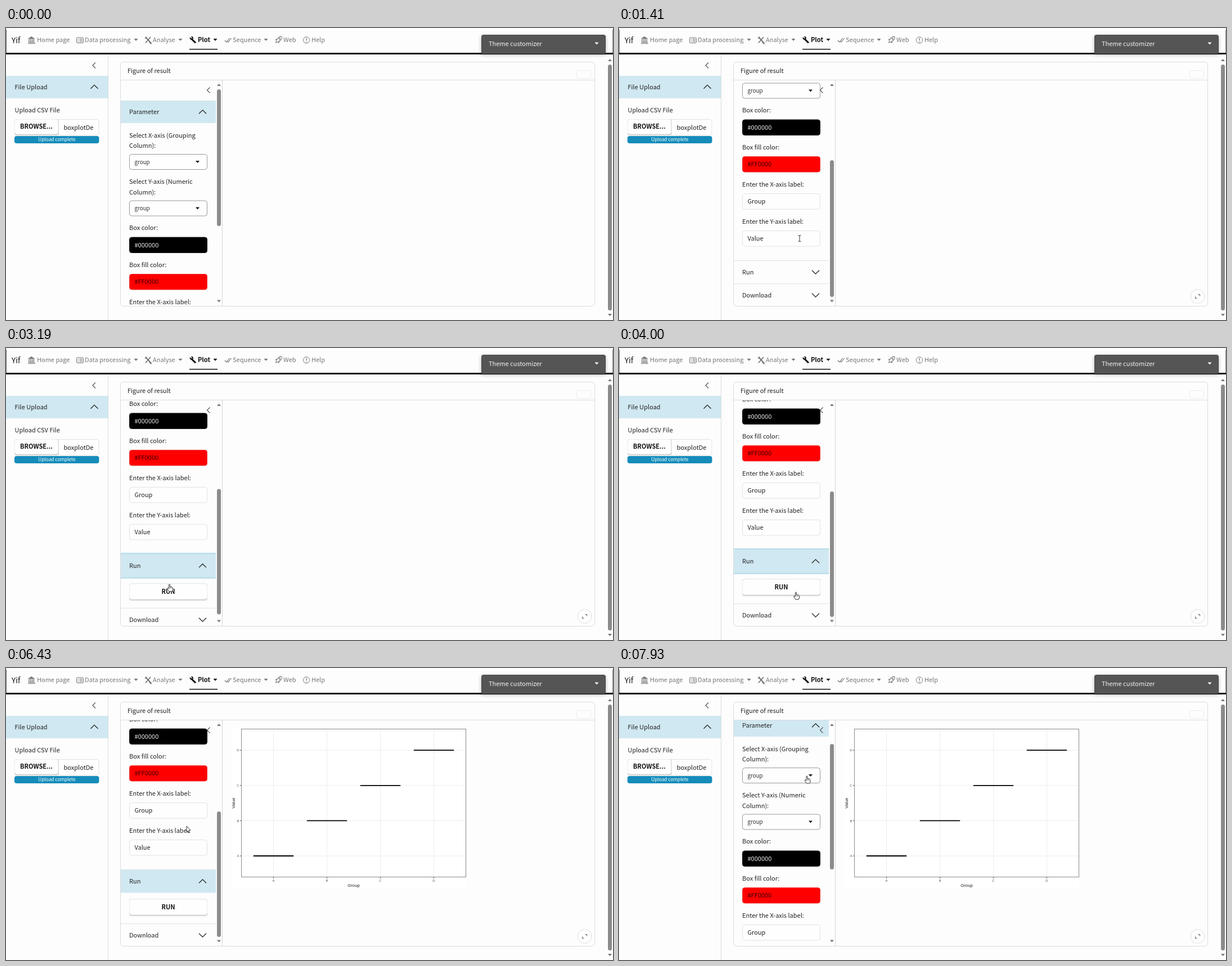
These frames come from a looping animation (1079x519 px, 8 s). An HTML page with a canvas:

```html
<!DOCTYPE html>
<html lang="en">
<head>
<meta charset="utf-8">
<title>Box plot panel</title>
<style>
  html, body { margin: 0; width: 100%; height: 100%; overflow: hidden; background: #fdfdfd; }
  canvas { display: block; }
</style>
</head>
<body>
<canvas id="stage" width="1079" height="519"></canvas>
<script>
const c = document.getElementById('stage').getContext('2d');
const LOOP = 8000, INK = '#222', GREY = '#777', BLUE = [208, 232, 241];
const SANS = '"Noto Sans CJK SC", "Noto Sans CJK JP", "Noto Sans CJK", "Open Sans", sans-serif';
const PLOT_SANS = '"Liberation Sans", sans-serif';

// Each key is [time, ...values]
const SCROLL = [[980, 0], [1180, 130], [1300, 190], [1390, 209], [3060, 209], [3190, 256],
  [3300, 264], [6950, 264], [7320, 182], [7930, 47]];
const POINTER = [[100, 345, -16], [940, 321, 374], [1430, 321, 374], [2050, 287, 432], [2680, 285, 432],
  [2960, 285, 417], [3100, 285, 417], [3490, 325, 437], [3680, 325, 437], [4380, 301, 430],
  [5600, 301, 430], [6380, 321, 281], [6500, 321, 281], [7320, 326, 237], [7930, 334, 192]];

const smooth = p => p * p * (3 - 2 * p);
const ramp = (t, from, to) => Math.min(1, Math.max(0, (t - from) / (to - from)));

function track(keys, t, ease = p => p) {
  let i = 0;
  while (i < keys.length - 2 && t > keys[i + 1][0]) i++;
  const [a, b] = [keys[i], keys[i + 1]], p = ease(ramp(t, a[0], b[0]));
  return a.slice(1).map((v, k) => v + (b[k + 1] - v) * p);
}

function text(str, x, mid, { size = 11, color = INK, bold = false, align = 'left', font = SANS } = {}) {
  c.font = `${bold ? 'bold ' : ''}${size}px ${font}`;
  c.fillStyle = color;
  c.textAlign = align;
  c.fillText(str, x, mid + size * 0.36);
}

function rect(x, y, w, h, color) {
  c.fillStyle = color;
  c.fillRect(x, y, w, h);
}

function box(x, y, w, h, r, fill, stroke) {
  c.beginPath();
  c.roundRect(x, y, w, h, r);
  if (fill) { c.fillStyle = fill; c.fill(); }
  if (stroke) { c.strokeStyle = stroke; c.lineWidth = 1; c.stroke(); }
}

function line(points, color = INK, width = 1) {
  c.beginPath();
  for (let i = 0; i < points.length; i += 2) c.lineTo(points[i], points[i + 1]);
  c.strokeStyle = color;
  c.lineWidth = width;
  c.stroke();
}

function polygon(points, fill, stroke) {
  c.beginPath();
  for (let i = 0; i < points.length; i += 2) c.lineTo(points[i], points[i + 1]);
  c.closePath();
  c.fillStyle = fill;
  c.fill();
  if (stroke) { c.strokeStyle = stroke; c.lineWidth = 1; c.stroke(); }
}

function ring(x, y, r, color, fill) {
  c.beginPath();
  c.arc(x, y, r, 0, 7);
  if (fill) { c.fillStyle = fill; c.fill(); }
  c.strokeStyle = color;
  c.lineWidth = 1;
  c.stroke();
}

// dir 1 points down, -1 points up
const triangle = (x, y, color, dir = 1, w = 3.5) =>
  polygon([x - w, y - 2 * dir, x + w, y - 2 * dir, x, y + 2 * dir], color);
const chevron = (x, y, dir) => line([x - 6.5, y - 3.2 * dir, x, y + 3.2 * dir, x + 6.5, y - 3.2 * dir], INK, 1.3);
const backArrow = (x, y) => line([x + 2.5, y - 5, x - 2.5, y, x + 2.5, y + 5], '#555', 1.2);
const blueMix = k => `rgb(${BLUE.map(v => 253 + (v - 253) * k)})`;

function scrollbar(x, top, bottom, thumbTop, thumbHeight) {
  triangle(x, top, '#777', -1);
  triangle(x, bottom, '#777');
  box(x - 3.5, thumbTop, 7, thumbHeight, 3.5, '#8b8b8b');
}

function button(x, y, w, h, label) {
  box(x, y, w, h, 4, '#d6d6d6');
  box(x + .5, y + .5, w - 1, h - 3, 4, '#fefefe', '#ececec');
  if (label) text(label, x + w / 2, y + h / 2 - 1, { bold: true, align: 'center', color: '#111' });
}

function icons() {
  polygon([39, 19, 45, 15, 51.5, 19], GREY);
  for (let x = 41; x < 51; x += 2.8) line([x, 19, x, 25], GREY, 1.4);
  line([40, 25.5, 51, 25.5], GREY);
  line([39, 27.5, 52, 27.5], GREY, 1.2);

  box(125.5, 17, 12, 9.5, 1.5, null, GREY);
  for (const y of [19.5, 21.8, 24]) {
    line([127.5, y, 129, y], GREY);
    line([130.5, y, 136, y], GREY);
  }

  line([248, 16, 257.5, 26.5], GREY, 2);
  line([257, 16, 248, 26.5], GREY, 1.8);
  line([247, 18, 249, 18, 250, 15.5], GREY, 1.3);
  line([255, 25, 258.5, 28], GREY, 2.4);

  line([330, 19.5, 337, 26.5], '#111', 3);
  line([327, 17, 329, 20, 332, 18, 330, 15], '#111', 2);

  line([389, 22, 392, 25, 397.5, 18], GREY, 1.2);
  line([394, 24, 395, 25, 400.5, 18], GREY, 1.2);

  c.save();
  c.translate(484.5, 21);
  c.rotate(Math.PI / 4);
  c.beginPath();
  c.ellipse(0, -1, 2.8, 6.5, 0, 0, 7);
  c.strokeStyle = GREY;
  c.stroke();
  ring(0, -2.5, 1, GREY);
  polygon([-2.5, 0, -5, 4, -2, 3.5], GREY);
  polygon([2.5, 0, 5, 4, 2, 3.5], GREY);
  line([0, 5, 0, 8], GREY);
  c.restore();

  ring(534, 21.5, 5.6, GREY);
  line([534, 18, 534, 22.5], GREY, 1.3);
  line([534, 24, 534, 25.2], GREY, 1.3);
}

function navbar() {
  rect(0, 44, 1079, 3, '#151519');
  rect(0, 3, 1, 41, '#666');
  rect(1078, 3, 1, 41, '#888');
  text('Yif', 10, 22, { size: 13.5, color: '#111' });
  icons();
  [['Home page', 55], ['Data processing', 140, 231], ['Analyse', 261, 310], ['Plot', 341, 372],
    ['Sequence', 403, 462], ['Web', 493], ['Help', 543]].forEach(([label, x, caret]) => {
    const bold = label === 'Plot', color = bold ? '#111' : GREY;
    text(label, x, 21.5, { color, bold });
    if (caret) triangle(caret, 21, color);
  });
  rect(326, 37, 50, 1.5, '#111');

  c.save();
  c.shadowColor = 'rgba(0,0,0,.3)';
  c.shadowBlur = 6;
  c.shadowOffsetY = 2;
  box(845, 12, 221, 33.5, [4, 4, 1, 1], '#555');
  c.restore();
  box(845.5, 12.5, 220, 33, [4, 4, 1, 1], null, '#484848');
  text('Theme customizer', 858, 28.5, { color: '#f2f2f2' });
  triangle(1050, 27.5, '#fff');
}

function sidebar() {
  rect(181, 47, 1, 472, '#dcdcdc');
  backArrow(156.5, 66.5);
  rect(0, 85, 181, 40, blueMix(1));
  text('File Upload', 15.5, 105);
  chevron(157, 104.5, -1);
  text('Upload CSV File', 15.5, 146);
  box(15.5, 162.5, 149.5, 28, 4, '#fefefe', '#e2e2e2');
  button(15, 162, 78, 29);
  rect(93, 163, 1, 27, '#ddd');
  text('BROWSE...', 25, 175.5, { bold: true, color: '#111' });
  text('boxplotDe', 102.5, 177);
  box(15, 192, 150.5, 13, 4, '#158cba');
  text('Upload complete', 90.5, 198.5, { size: 8.3, color: '#fff', align: 'center' });
}

function select(y) {
  box(219.5, y + .5, 138, 27, 4, '#fefefe', '#9a9a9a');
  text('group', 228.5, y + 14, { size: 9.8, color: '#333' });
  triangle(340.5, y + 14, '#111');
}

function field(y, value, fill = '#fefefe', color = INK, border = '#e2e2e2') {
  box(219.5, y + .5, 138, 27.5, 4, fill, border);
  text(value, 228.5, y + 14.3, { color });
}

function parameters(t, scroll, open) {
  c.save();
  c.beginPath();
  c.rect(204, 93, 170, 401);
  c.clip();
  c.translate(0, -scroll);

  rect(204, 129, 169, 40, blueMix(1));
  text('Parameter', 219, 149);
  chevron(349.5, 149, -1);
  [['Select X-axis (Grouping', 191], ['Column):', 209.5], ['Select Y-axis (Numeric', 273], ['Column):', 291.8],
    ['Box color:', 355.5], ['Box fill color:', 421.5], ['Enter the X-axis label:', 487.3],
    ['Enter the Y-axis label:', 553.3]].forEach(([label, y]) => text(label, 219, y));
  select(224);
  select(306.5);
  field(371.5, '#000000', '#000', '#eee', '#111');
  field(437, '#FF0000', '#f00', '#300', '#e33');
  field(503, 'Group');
  field(569, 'Value');

  const grow = 55 * open, focus = ramp(t, 2150, 2300) * (1 - ramp(t, 5050, 5200));
  rect(204, 622, 169, 1, '#e2e2e2');
  if (open) {
    c.save();
    c.beginPath();
    c.rect(204, 663, 169, grow);
    c.clip();
    button(219, 674.5, 139, 30.5);
    const ripple = ramp(t, 4570, 4950), fade = 1 - ramp(t, 5000, 5220);
    if (ripple && fade) {
      c.save();
      c.beginPath();
      c.rect(220, 675, 137, 27);
      c.clip();
      c.globalAlpha = fade;
      c.beginPath();
      c.arc(305, 703, 22 * ripple, 0, 7);
      c.fillStyle = '#ededed';
      c.fill();
      c.restore();
    }
    text('RUN', 288.5, 689.5, { bold: true, align: 'center', color: '#111' });
    c.restore();
    if (focus) {
      c.globalAlpha = focus;
      rect(204, 620, 169, 46, '#bcdfec');
      c.globalAlpha = 1;
    }
  }
  rect(204, 622.5, 169, 41, open ? blueMix(ramp(open, 0, .4)) : '#fdfdfd');
  if (!open) rect(204, 622, 169, 1, '#e2e2e2');
  text('Run', 219, 643);
  chevron(349.5, 643, 1 - 2 * ramp(open, 0, .5));
  rect(204, 663 + grow, 169, 1, '#e2e2e2');
  text('Download', 219, 684 + grow);
  chevron(349.5, 684 + grow, 1);
  c.restore();
}

function plot() {
  rect(401, 108, 417, 283, '#fff');
  'ABCD'.split('').forEach((name, i) => {
    const x = 475.5 + 95 * i, y = 334 - 62.6 * i;
    const small = { size: 6, color: '#555', font: PLOT_SANS };
    line([x, 109, x, 371], '#ededed');
    line([419, y, 817, y], '#ededed');
    line([x, 372, x, 374], '#444');
    line([416, y, 418, y], '#444');
    text(name, x, 378, { ...small, align: 'center' });
    text(name, 414.5, y, { ...small, align: 'right' });
  });
  for (let i = 0; i < 4; i++) {
    const x = 475.5 + 95 * i, y = 334 - 62.6 * i;
    line([x - 35.7, y, x + 35.7, y], '#000', 1.8);
  }
  c.strokeStyle = '#8a8a8a';
  c.lineWidth = 1;
  c.strokeRect(418.5, 108.5, 399, 263);
  const title = { size: 7.8, align: 'center', font: PLOT_SANS };
  text('Group', 618, 386, title);
  c.save();
  c.translate(404.5, 240);
  c.rotate(-Math.PI / 2);
  text('Value', 0, 0, title);
  c.restore();
}

function expandButton() {
  ring(1028.5, 477, 12.5, '#dedede', '#fefefe');
  line([1029.5, 473.5, 1032.5, 473.5, 1032.5, 476.5], '#555');
  line([1024.5, 477.5, 1024.5, 480.5, 1027.5, 480.5], '#555');
}

function pointer(x, y, scroll, open) {
  const row = y + scroll, inside = ranges => ranges.some(([a, b]) => row >= a && row <= b);
  const inPanel = y > 93 && x > 219 && x < 358;
  const hands = [[129, 169], [224, 251], [307, 334], [622, 663]];
  if (open) hands.push([672, 705]);
  c.save();
  c.translate(x, y);
  if (inPanel && inside([[372, 399], [437, 465], [503, 531], [569, 597]])) {
    line([-2.5, -5.5, 0, -5, 2.5, -5.5], '#333');
    line([0, -5, 0, 5], '#333');
    line([-2.5, 5.5, 0, 5, 2.5, 5.5], '#333');
  } else if (inPanel && inside(hands)) {
    polygon([-1, .5, 0, 0, 1, .5, 1, 5, 3, 4.6, 5, 5.4, 6, 6.5, 6, 10, 4.7, 13, -.5, 13,
      -3.6, 8.5, -3.6, 7, -2, 7, -1, 8.2], '#fff', '#333');
    line([1.5, 5, 1.5, 8], '#333', .7);
    line([3.7, 5.5, 3.7, 8], '#333', .7);
  } else {
    polygon([0, 0, 0, 10.5, 2.4, 8.4, 4, 12, 5.5, 11.3, 4, 7.8, 7, 7.5], '#fff', '#333');
  }
  c.restore();
}

function draw(t) {
  const [scroll] = track(SCROLL, t), [px, py] = track(POINTER, t, smooth);
  const open = smooth(ramp(t, 2150, 2500));
  rect(0, 0, 1079, 519, '#fdfdfd');
  sidebar();
  navbar();
  scrollbar(1073.5, 57, 510, 65, 437);

  box(203.5, 60.5, 843, 434, 5, '#fdfdfd', '#dcdcdc');
  text('Figure of result', 216, 76.3);
  box(1014.5, 75.5, 25, 14, 3, null, '#ebebeb');
  rect(204, 92, 842, 1, '#dcdcdc');
  rect(384, 92, 1, 403, '#d5d5d5');
  parameters(t, scroll, open);
  backArrow(360, 110.5);
  const thumb = 243 - 20 * open;
  scrollbar(378.5, 101, 485.5, 109 + scroll * (369 - thumb) / (209 + 55 * open), thumb);
  if (t >= 5360) plot();
  if (py > 60) expandButton();
  pointer(px, py, scroll, open);
}

function frame() {
  draw(performance.now() % LOOP);
  requestAnimationFrame(frame);
}
frame();
</script>
</body>
</html>
```
